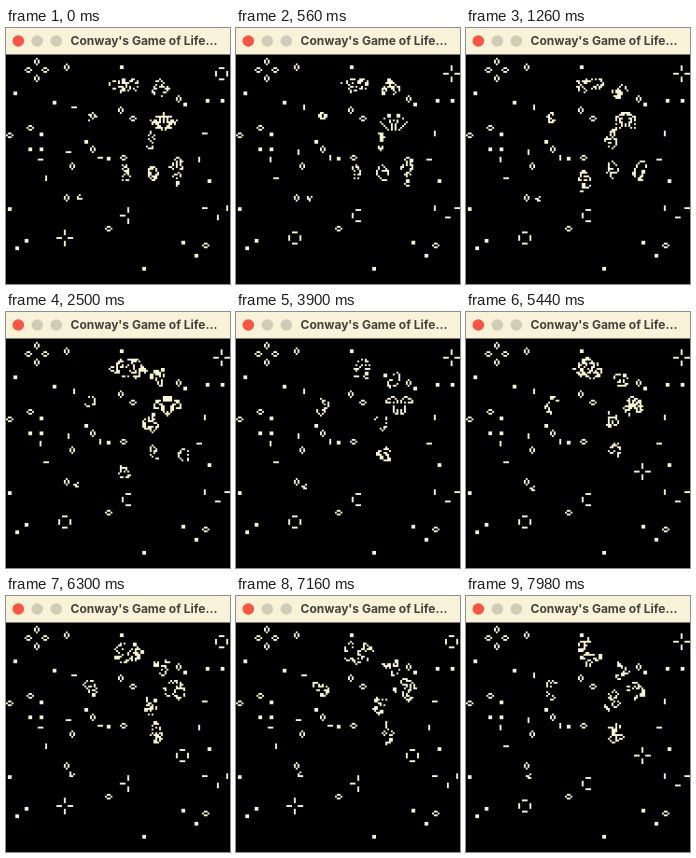
These frames come from a looping animation (224 by 256 pixels, 8 s). An HTML page with a canvas:

```html
<!DOCTYPE html>
<html lang="en">
<head>
<meta charset="utf-8">
<title>Conway's Game of Life</title>
<style>
  html, body { margin: 0; width: 100%; height: 100%; overflow: hidden; background: #000; }
  canvas { display: block; width: 224px; height: 256px; }
</style>
</head>
<body>
<canvas id="stage" width="224" height="256"></canvas>
<script>
const ctx = document.getElementById('stage').getContext('2d');
const SIZE = 120, CELL = 224 / SIZE, TOP = 28;
const LOOP = 8000, GENERATION = 346, COUNT = 24, RESEED = 3;

const BLOCK = ['OO', 'OO'];
const UPRIGHT_HIVE = ['.O.', 'O.O', 'O.O', '.O.'];
const FLAT_HIVE = ['.OO.', 'O..O', '.OO.'];
const GLIDER = ['.O.', 'O..', 'OOO'];
const FLAT_BAR = ['OOO'];
const UPRIGHT_BAR = ['O', 'O', 'O'];

// Where the settled objects lie: "x,y" centres in pixels
const blocks = '10,66 48,75 116,39 180,76 202,73 216,72 35,106 25,122 36,122 ' +
  '81,113 103,130 204,153 3,181 20,213 12,221 178,215 190,227 139,241';
const uprightHives = '60,40 172,71 114,83 66,139 61,170 87,122';
const flatHives = '4,108 24,99 118,130 126,90 102,201 200,218';
const flatBars = '68,80 63,124 95,130 35,132 199,106 199,181';
const uprightBars = '41,150 193,131 211,190 222,181';

// Restless areas drift and change size; each is [x, y, radius x, radius y]
const clusters = [
  { from: [121, 56, 19, 7], to: [121, 55, 14, 12] },
  { from: [153, 60, 8, 8], to: [156, 72, 9, 10] },
  { from: [157, 94, 15, 9], to: [170, 94, 9, 10], symmetric: true },
  { from: [143, 112, 6, 10], to: [145, 104, 7, 12] },
  { from: [146, 143, 7, 8], to: [150, 135, 7, 12] },
  { from: [84, 90, 6, 6], to: [84, 92, 8, 11] },
  { from: [170, 141, 7, 14], to: [180, 141, 6, 4], until: 9 },
  { from: [118, 148, 5, 16], to: [116, 165, 8, 5], until: 9 }
];

const newGrid = () => new Uint8Array(SIZE * SIZE);

function setCell(grid, x, y) {
  if (x >= 0 && x < SIZE && y >= 0 && y < SIZE) grid[y * SIZE + x] = 1;
}

function stamp(grid, rows, px, py) {
  const x0 = Math.round(px / CELL - rows[0].length / 2);
  const y0 = Math.round((py - TOP) / CELL - rows.length / 2);
  rows.forEach((row, y) => [...row].forEach((c, x) => {
    if (c === 'O') setCell(grid, x0 + x, y0 + y);
  }));
}

function stampAll(grid, rows, places) {
  for (const place of places.split(' ')) stamp(grid, rows, ...place.split(',').map(Number));
}

// Visits points around a centre: below, left, above, right
function around(px, py, cells, arms, visit) {
  for (let k = 1; k <= arms; k++) {
    const a = k * Math.PI / 2, r = cells * CELL;
    visit(px + r * Math.cos(a), py + r * Math.sin(a), k % 2 === 1);
  }
}

function stampTrafficLight(grid, px, py, outward, arms = 4) {
  around(px, py, 3, arms, (x, y, vertical) =>
    stamp(grid, vertical === outward ? UPRIGHT_BAR : FLAT_BAR, x, y));
}

function stampHoneyFarm(grid, px, py) {
  around(px, py, 4.5, 4, (x, y, vertical) =>
    stamp(grid, vertical ? UPRIGHT_HIVE : FLAT_HIVE, x, y));
}

function stampSettled(grid, gen) {
  const odd = gen % 2 === 1;
  stampAll(grid, BLOCK, blocks);
  stampAll(grid, UPRIGHT_HIVE, uprightHives);
  stampAll(grid, FLAT_HIVE, flatHives);
  stampAll(grid, odd ? UPRIGHT_BAR : FLAT_BAR, flatBars);
  stampAll(grid, odd ? FLAT_BAR : UPRIGHT_BAR, uprightBars);
  stampHoneyFarm(grid, 30, 42.5);
  stampTrafficLight(grid, 59, 210.5, !odd);
  stampTrafficLight(grid, 216, 46.5, odd);
  stampTrafficLight(grid, 123, 187.5, !odd, 3);
  if (gen >= 14) stampTrafficLight(grid, 177, 159.5, odd);
}

function evolve(grid) {
  const next = newGrid();
  for (let y = 1; y < SIZE - 1; y++) {
    for (let x = 1; x < SIZE - 1; x++) {
      const i = y * SIZE + x;
      let n = 0;
      for (let d = -SIZE; d <= SIZE; d += SIZE) {
        n += grid[i + d - 1] + grid[i + d] + grid[i + d + 1];
      }
      next[i] = n === 3 || (n === 4 && grid[i]) ? 1 : 0;
    }
  }
  return next;
}

function noise(x, y, seed) {
  const v = Math.sin(x * 12.9898 + y * 78.233 + seed * 37.719) * 43758.5453;
  return v - Math.floor(v);
}

function sow(grid, { from, to, until = COUNT, symmetric }, gen) {
  if (gen >= until) return;
  const t = gen / Math.min(until, COUNT - 1);
  const [px, py, rx, ry] = from.map((v, i) => v + (to[i] - v) * t);
  const cx = Math.round(px / CELL), cy = Math.round((py - TOP) / CELL);
  const w = rx / CELL, h = ry / CELL;
  for (let dy = -Math.ceil(h); dy <= h; dy++) {
    for (let dx = -Math.ceil(w); dx <= w; dx++) {
      const column = symmetric && gen < COUNT / 2 ? Math.abs(dx) : dx;
      const inside = (dx / w) ** 2 + (dy / h) ** 2 <= 1;
      if (inside && noise(cx + column, cy + dy, gen) < 0.4) setCell(grid, cx + dx, cy + dy);
    }
  }
}

function seedActivity(gen) {
  const grid = newGrid();
  clusters.forEach(cluster => sow(grid, cluster, gen));
  return evolve(grid);
}

const generations = [];
let activity, glider = newGrid();
stamp(glider, GLIDER, 74, 168);
for (let gen = 0; gen < COUNT; gen++) {
  activity = gen % RESEED === 0 ? seedActivity(gen) : evolve(activity);
  if (gen) glider = evolve(glider);
  const grid = activity.map((alive, i) => alive | glider[i]);
  stampSettled(grid, gen);
  generations.push(grid);
}

function drawCells(grid) {
  // Adding light keeps the seams between neighbouring cells closed
  ctx.globalCompositeOperation = 'lighter';
  ctx.fillStyle = '#f8f6d0';
  grid.forEach((alive, i) => {
    if (alive) ctx.fillRect(i % SIZE * CELL, TOP + Math.floor(i / SIZE) * CELL, CELL, CELL);
  });
  ctx.globalCompositeOperation = 'source-over';
}

function drawTitleBar() {
  ctx.fillStyle = '#f8f2d8';
  ctx.fillRect(0, 0, 224, 26.5);
  ['#fa5443', '#d0ccb8', '#d0ccb8'].forEach((color, i) => {
    ctx.fillStyle = color;
    ctx.beginPath();
    ctx.arc(12.3 + 19 * i, 13, 5.8, 0, Math.PI * 2);
    ctx.fill();
  });
  ctx.fillStyle = '#45423c';
  ctx.font = '700 12px Inter, sans-serif';
  ctx.fillText("Conway's Game of Life…", 64.5, 17);
}

function draw() {
  const gen = Math.floor(performance.now() % LOOP / GENERATION);
  ctx.fillStyle = '#000';
  ctx.fillRect(0, 0, 224, 256);
  drawCells(generations[Math.min(gen, COUNT - 1)]);
  drawTitleBar();
  requestAnimationFrame(draw);
}
requestAnimationFrame(draw);
</script>
</body>
</html>
```
